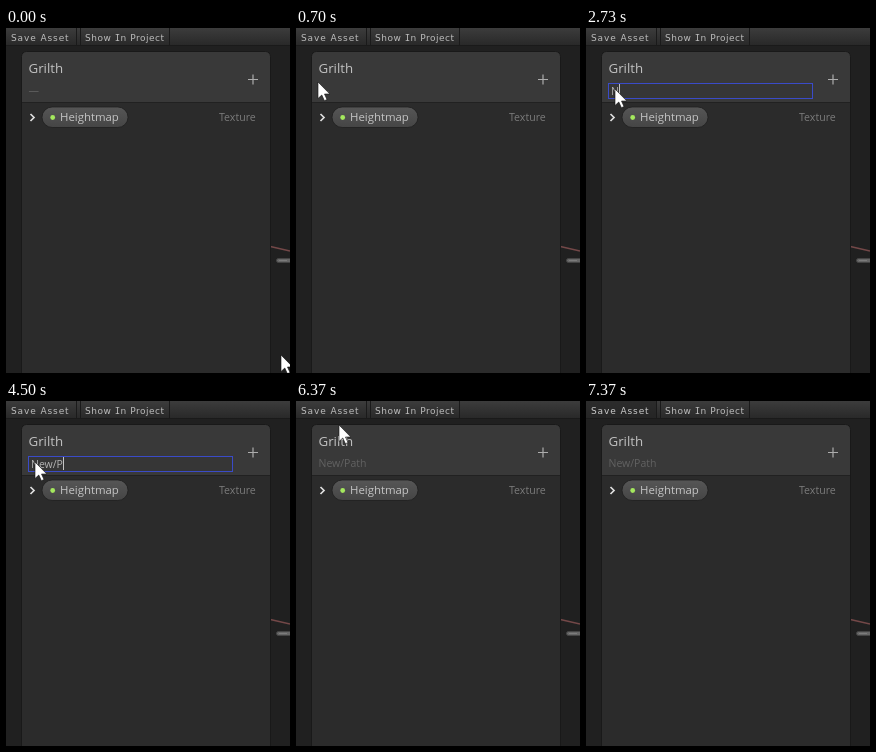
An HTML page that plays this animation: 284 px wide and 345 px high, repeating every 7960 ms.

```html
<!DOCTYPE html>
<html lang="en">
<head>
<meta charset="utf-8">
<title>Renaming a graph path</title>
<style>
  html, body { margin: 0; width: 100%; height: 100%; overflow: hidden; background: #202020; }
  svg { display: block; width: 100vw; height: 100vh; }
  text { font-family: "Open Sans", "Noto Sans", sans-serif; font-size: 10.5px; white-space: pre; }
  .tool { font-family: "DejaVu Sans", sans-serif; font-size: 9px; fill: #bcbcbc; }
  .mono { font-family: "DejaVu Sans Mono", monospace; }
</style>
</head>
<body>
<svg viewBox="0 0 284 345">
  <defs>
    <linearGradient id="bar" x2="0" y2="1">
      <stop offset="0" stop-color="#3c3c3c"/>
      <stop offset="1" stop-color="#292929"/>
    </linearGradient>
    <linearGradient id="down" x2="0" y2="1">
      <stop offset="0" stop-color="#2c2c2c"/>
      <stop offset="1" stop-color="#252525"/>
    </linearGradient>
    <linearGradient id="pill" x2="0" y2="1">
      <stop offset="0" stop-color="#565656"/>
      <stop offset="1" stop-color="#454545"/>
    </linearGradient>
  </defs>
  <rect width="284" height="345" fill="#202020"/>

  <!-- Graph behind the panel -->
  <path d="M260 217.5L284 223" stroke="#744848" stroke-width="1.6"/>
  <rect x="270.5" y="230.5" width="20" height="4" rx="2" fill="#666" stroke="#444"/>
  <path d="M273 232.5H281" stroke="#7c7c7c"/>

  <!-- Toolbar -->
  <rect width="284" height="17" fill="url(#bar)"/>
  <rect id="pressed" width="70" height="17" fill="url(#down)"/>
  <path d="M0 17.5H284M70.5 0V17M74.5 0V17M163.5 0V17" stroke="#1a1a1a"/>
  <text id="save" class="tool" x="5" y="13" letter-spacing=".9">Save Asset</text>
  <text class="tool" x="79" y="13" letter-spacing=".5">Show <tspan class="mono">I</tspan>n Project</text>

  <!-- Panel -->
  <path d="M15.5 346V28.5a5 5 0 0 1 5-5H259.5a5 5 0 0 1 5 5V346Z" fill="#2b2b2b"/>
  <path d="M15.5 74V28.5a5 5 0 0 1 5-5H259.5a5 5 0 0 1 5 5V74Z" fill="#393939"/>
  <path d="M15.5 74.5H264.5" stroke="#212121"/>
  <path d="M15.5 346V28.5a5 5 0 0 1 5-5H259.5a5 5 0 0 1 5 5V346" fill="none" stroke="#191919"/>
  <text x="22.5" y="45" fill="#c1c1c1" style="font-size:13.3px">Grilth</text>
  <path d="M242 51.5H252M247 46.5V56.5" stroke="#acacac" stroke-width="1.2"/>

  <!-- Property row -->
  <path d="M24.5 86L28 89.5L24.5 93" fill="none" stroke="#dedede" stroke-width="1.7"/>
  <rect x="36" y="79" width="86" height="20.5" rx="10.2" fill="url(#pill)" stroke="#1f1f1f" stroke-width=".8"/>
  <circle cx="46.7" cy="89.5" r="2.4" fill="#a4e85e"/>
  <text x="54" y="93" fill="#c4c4c4" style="font-size:11.4px">Heightmap</text>
  <text x="213" y="93" fill="#7b7b7b" style="font-size:10.6px">Texture</text>

  <!-- Path label and its editor -->
  <text id="label" x="22.5" y="66" fill="#626262"></text>
  <g id="field">
    <rect x="22.5" y="55.5" width="204" height="15" fill="#363636" stroke="#3a4bc8"/>
    <rect id="selection" x="25" y="56" width="11" height="13" fill="#3c5f98"/>
    <text id="typed" x="25" y="67" fill="#b4b4b4"></text>
    <rect id="caret" y="56" width="1" height="13" fill="#c4c4c4"/>
  </g>

  <!-- Pointer -->
  <g id="busy" fill="none">
    <circle cx="62.5" cy="12.5" r="5.2" fill="#1b3a52" stroke="#2189dc" stroke-width="4.4"/>
    <circle cx="62.5" cy="12.5" r="6.6" stroke="#3fa6ee" stroke-width="1.2"/>
  </g>
  <path id="arrow" d="M0 0V16.5L3.8 13L6.4 18.7L9 17.6L6.5 12H11.8Z" fill="#fff" stroke="#111" stroke-width=".6"/>
</svg>
<script>
const LOOP = 7960;
const EMPTY = "—", PATH = "New/Path";
const OPEN = 1470, CLOSE = 5570, PRESS = 6700, BUSY = 6800, HIDE = 7000;

// Typing starts here; each digit is the wait before the next letter, in beats
const TYPE = 2730, BEAT = 135.3, RHYTHM = "2533121";

// Each pointer move eases out along its points in even steps
const MOVES = [
  { start: 30, end: 370, steps: 8, points: [[275, 327], [86, 92], [20, 29], [5, 47]] },
  { start: 530, end: 1000, steps: 13, points: [[5, 47], [0, 45], [25, 55], [29, 61]] },
  { start: 6230, end: 6530, steps: 10, points: [[29, 61], [48, 12]] },
  { start: 7170, end: 7370, steps: 7, points: [[35, -75], [81, 312]] }
];
const REST = MOVES[0].points[0];
const LAST = MOVES[MOVES.length - 1];

const el = Object.fromEntries([...document.querySelectorAll("[id]")].map(e => [e.id, e]));
const show = (node, on) => node.setAttribute("visibility", on ? "visible" : "hidden");
const easeOut = u => 1 - (1 - u) ** 2;

function along(points, u) {
  const place = u * (points.length - 1);
  const i = Math.min(Math.floor(place), points.length - 2);
  return points[i].map((v, axis) => Math.round(v + (points[i + 1][axis] - v) * (place - i)));
}

function pointerAt(t) {
  const move = MOVES.filter(m => t >= m.start).pop();
  if (!move) return REST;
  const { start, end, steps, points } = move;
  const passed = Math.floor((t - start) / (end - start) * (steps - 1)) + 1;
  return along(points, easeOut(Math.min(1, passed / steps)));
}

function lettersAt(t) {
  if (t < TYPE) return 0;
  let count = 1, due = TYPE;
  for (const wait of RHYTHM) {
    due += wait * BEAT;
    if (t >= due) count++;
  }
  return count;
}

function drawField(t) {
  const editing = t >= OPEN && t < CLOSE;
  const count = lettersAt(t);
  show(el.label, !editing);
  show(el.field, editing);
  show(el.selection, editing && !count);
  show(el.caret, editing && count);
  el.label.textContent = t < CLOSE ? EMPTY : PATH;
  el.typed.textContent = count ? PATH.slice(0, count) : EMPTY;
  el.caret.setAttribute("x", 25 + Math.round(el.typed.getComputedTextLength()));
}

function draw(t) {
  drawField(t);
  show(el.pressed, t >= PRESS);
  el.save.style.fill = t >= PRESS ? "#cacaca" : "";
  show(el.busy, t >= BUSY && t < HIDE);
  show(el.arrow, t < HIDE || (t >= LAST.start && t < LAST.end));
  el.arrow.setAttribute("transform", `translate(${pointerAt(t)})`);
}

let origin;
function frame(now) {
  origin ??= now;
  draw((now - origin) % LOOP);
  requestAnimationFrame(frame);
}
draw(0);
requestAnimationFrame(frame);
</script>
</body>
</html>
```
